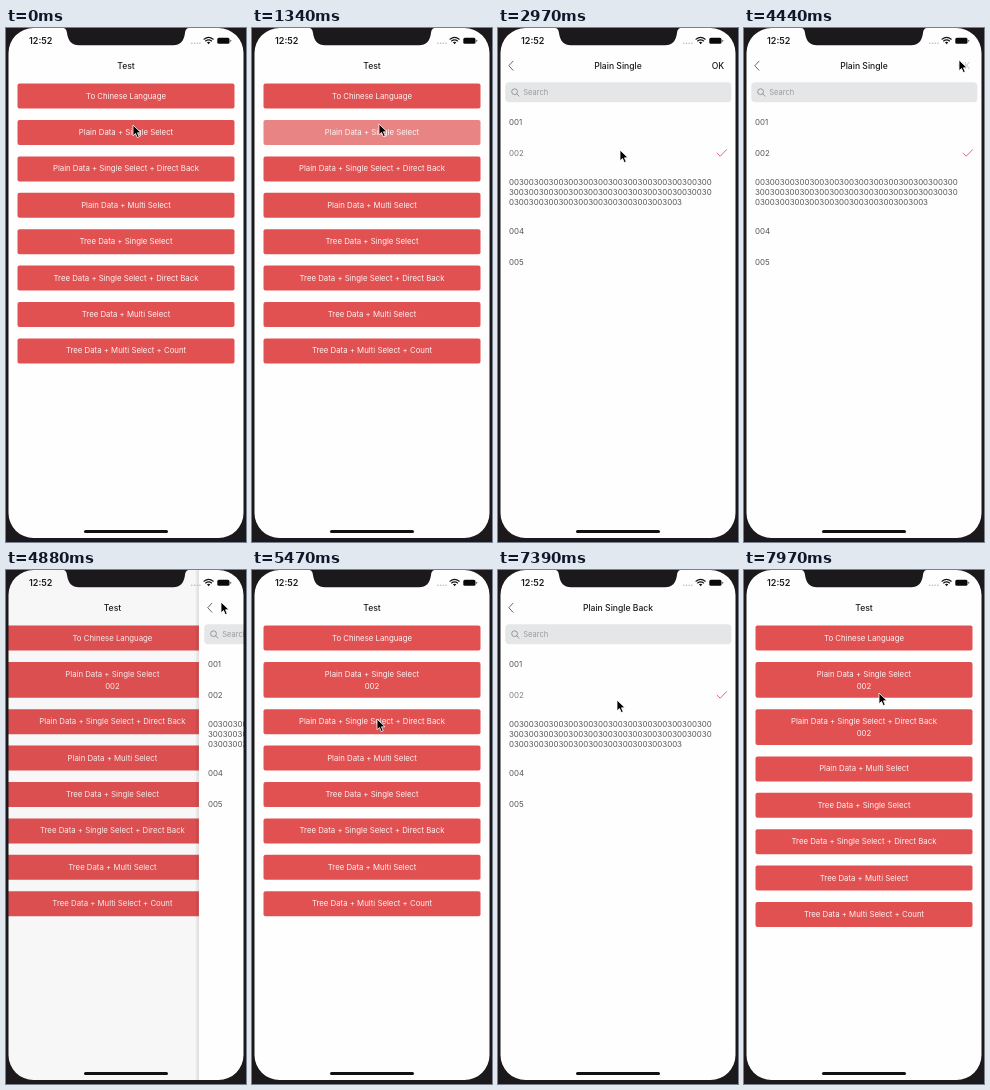
Recreate the animation shown at these times as an HTML page. Size 240 by 514 pixels, loop 8 s.

```html
<!DOCTYPE html>
<html lang="en">
<head>
<meta charset="utf-8">
<title>Picker demo</title>
<style>
  html, body { margin: 0; width: 100%; height: 100%; overflow: hidden; background: #1b191b; }
  svg { display: block; width: 100%; height: 100%; font-family: Inter, "Liberation Sans", sans-serif; }
  .title { font-size: 8.6px; font-weight: 500; fill: #1c1c1e; }
  .mid { text-anchor: middle; }
  .label { font-size: 7.8px; fill: #fff; fill-opacity: .92; text-anchor: middle; }
  .row { font-size: 7.9px; fill: #555; }
  .line { fill: none; stroke-linecap: round; stroke-linejoin: round; }
</style>
</head>
<body>
<svg id="stage" viewBox="0 0 240 514" preserveAspectRatio="none"></svg>
<script>
const LOOP = 8000;
const NS = 'http://www.w3.org/2000/svg';
const stage = document.getElementById('stage');

function add(parent, tag, attrs = {}, text) {
  const el = document.createElementNS(NS, tag);
  for (const key in attrs) el.setAttribute(key, attrs[key]);
  if (text) el.textContent = text;
  parent.appendChild(el);
  return el;
}
const label = (parent, cls, x, y, text) => add(parent, 'text', { class: cls, x, y }, text);
const move = (el, x, y = 0) => el.setAttribute('transform', `translate(${x} ${y})`);
const fade = (el, value) => el.setAttribute('opacity', value);

// Home screen
const home = add(stage, 'g');
add(home, 'rect', { x: 2, width: 236, height: 514, fill: '#fefefe' });
label(home, 'title mid', 120, 40.8, 'Test');
const buttons = [
  'To Chinese Language',
  'Plain Data + Single Select',
  'Plain Data + Single Select + Direct Back',
  'Plain Data + Multi Select',
  'Tree Data + Single Select',
  'Tree Data + Single Select + Direct Back',
  'Tree Data + Multi Select',
  'Tree Data + Multi Select + Count'
].map(text => {
  const g = add(home, 'g');
  const box = add(g, 'rect', { x: 11.5, width: 217, height: 25, rx: 2, fill: '#e15152' });
  label(g, 'label', 120, 15.1, text);
  const value = label(g, 'label', 120, 27, '002');
  return { g, box, value };
});
const dim = add(stage, 'rect', { x: 2, width: 236, height: 514, fill: '#000' });

// Picker screen
const page = add(stage, 'g');
const grad = add(add(stage, 'defs'), 'linearGradient', { id: 'edge' });
add(grad, 'stop', { offset: 0, 'stop-color': '#000', 'stop-opacity': 0 });
add(grad, 'stop', { offset: 1, 'stop-color': '#000', 'stop-opacity': .12 });
add(page, 'rect', { x: -2, width: 4, height: 514, fill: 'url(#edge)' });
add(page, 'rect', { x: 2, width: 236, height: 514, fill: '#fefefe' });
add(page, 'path', { class: 'line', d: 'M15 33.2L10.8 37.7L15 42.2', stroke: '#555', 'stroke-width': .9 });
const title = label(page, 'title mid', 120, 40.8, 'Plain Single');
const ok = label(page, 'title', 213.7, 40.8, 'OK');
add(page, 'rect', { x: 7.3, y: 54.3, width: 226, height: 20, rx: 4, fill: '#e5e6e7' });
add(page, 'circle', { cx: 16.6, cy: 63.7, r: 2.9, fill: 'none', stroke: '#8e8e93', 'stroke-width': .9 });
add(page, 'path', { class: 'line', d: 'M18.8 65.9L21 68.1', stroke: '#8e8e93', 'stroke-width': .9 });
label(page, 'row', 25.3, 67, 'Search').setAttribute('style', 'font-size:7.5px;fill:#9a9a9e');
label(page, 'row', 11, 96.9, '001');
const picked = label(page, 'row', 11, 127.7, '002');
const long = '003'.repeat(39);
for (let i = 0; i < 3; i++) label(page, 'row', 11, 157.3 + i * 9.6, long.substr(i * 41, 41));
label(page, 'row', 11, 205.7, '004');
label(page, 'row', 11, 236.6, '005');
const check = add(page, 'path', { class: 'line', d: 'M219 125.2L222.2 128.2L228.6 121.6', stroke: '#e8546c', 'stroke-width': .9 });

// Status bar and phone body
label(stage, 'title', 23, 16, '12:52').setAttribute('style', 'font-size:9px;font-weight:600');
for (let i = 0; i < 4; i++) add(stage, 'circle', { cx: 185.8 + i * 2.7, cy: 15.3, r: .75, fill: '#b5b5b8' });
add(stage, 'path', { d: 'M202.6 16.2L200.9 14.3Q202.6 13 204.3 14.3Z', fill: '#111' });
for (const [d, y] of [[3, 12.9], [4.6, 11.2]])
  add(stage, 'path', { class: 'line', d: `M${202.6 - d} ${y}Q202.6 ${y - d * .75} ${202.6 + d} ${y}`, stroke: '#111', 'stroke-width': 1.2 });
add(stage, 'rect', { x: 211.3, y: 9.8, width: 12.2, height: 6, rx: 1.6, fill: '#0a0a0a' });
add(stage, 'rect', { x: 224.2, y: 11.8, width: .9, height: 2, rx: .4, fill: '#555' });
add(stage, 'path', {
  d: 'M0 0H240V514H0ZM27.5 0A25 25 0 0 0 2.5 25V485A25 25 0 0 0 27.5 510H212.5A25 25 0 0 0 237.5 485V25A25 25 0 0 0 212.5 0Z',
  fill: '#1b191b', 'fill-rule': 'evenodd'
});
add(stage, 'path', {
  d: 'M56 0C60 0 60.5 2 61 5C62 13 66 17.3 73 17.3H167C174 17.3 178 13 179 5C179.5 2 180 0 184 0Z',
  fill: '#1b191b'
});
add(stage, 'rect', { x: 78, y: 502, width: 84, height: 3, rx: 1.5, fill: '#111' });
const cursor = add(stage, 'path', {
  d: 'M0 0V10.8L2.5 8.5L4.3 12.6L6.2 11.8L4.5 7.8H8Z',
  fill: '#000', stroke: '#fff', 'stroke-width': .8
});

// The picture is refreshed at these times: first, last, count
const ticks = [0, 150, 290, 590, 890, 5910];
for (const [a, b, n] of [[1340, 2380, 8], [2530, 2970, 4], [3410, 4440, 8], [4730, 5770, 8], [6210, 7240, 8], [7390, 7970, 5]])
  for (let i = 0; i < n; i++) ticks.push(Math.round((a + (b - a) * i / (n - 1)) / 10) * 10);
ticks.sort((a, b) => a - b);

const path = [
  [0, 127, 97], [290, 127, 96], [2380, 127, 96], [2820, 122, 122], [3410, 122, 122],
  [4290, 215, 32], [4880, 215, 32], [5470, 125, 149], [5770, 119, 153], [6510, 119, 153],
  [7090, 119, 130], [7530, 119, 130], [7970, 135, 123]
];

const clamp = v => Math.min(1, Math.max(0, v));
const smooth = v => v * v * (3 - 2 * v);

function cursorAt(t) {
  let i = 0;
  while (i < path.length - 2 && path[i + 1][0] <= t) i++;
  const [t0, x0, y0] = path[i], [t1, x1, y1] = path[i + 1];
  const k = smooth(clamp((t - t0) / (t1 - t0)));
  return [x0 + (x1 - x0) * k, y0 + (y1 - y0) * k];
}

// Screen change over 500 ms, cubic-bezier(.2833, .99, .31833, .99)
function slide(t, start) {
  const x = clamp((t - start) / 500);
  const bez = (a, b, s) => 3 * (1 - s) * (1 - s) * s * a + 3 * (1 - s) * s * s * b + s * s * s;
  let lo = 0, hi = 1;
  for (let i = 0; i < 20; i++) {
    const m = (lo + hi) / 2;
    if (bez(.2833, .31833, m) < x) lo = m; else hi = m;
  }
  return x === 0 ? 0 : x === 1 ? 1 : bez(.99, .99, hi);
}

function press(t, down, up, low, back) {
  if (t < down) return 1;
  return low + (1 - low) * clamp((t - up) / back);
}

function draw(t) {
  const second = t >= 5910;
  const p = slide(t, 1340) - slide(t, 4730) + slide(t, 6210) - slide(t, 7390);

  move(home, -71 * p);
  dim.setAttribute('opacity', .15 * p);
  move(page, 236 * (1 - p));
  page.setAttribute('visibility', p > 0 ? 'visible' : 'hidden');

  const filled = [, t >= 4730, t >= 7390];
  const held = [, press(t, 890, 1340, .7, 400), press(t, 5910, 6210, .7, 400)];
  let y = 55.6;
  buttons.forEach(({ g, box, value }, i) => {
    const extra = filled[i] ? 10.8 : 0;
    move(g, 0, y);
    fade(g, held[i] || 1);
    box.setAttribute('height', 25 + extra);
    value.setAttribute('visibility', extra ? 'inherit' : 'hidden');
    y += 36.4 + extra;
  });

  title.textContent = second ? 'Plain Single Back' : 'Plain Single';
  fade(ok, second ? 0 : press(t, 4440, 4730, .2, 300));
  fade(picked, second ? press(t, 7240, 7240, .6, 400) : press(t, 2820, 2820, .6, 300));
  fade(check, (second ? t >= 7390 : t >= 2970) ? 1 : 0);
  move(cursor, ...cursorAt(t));
}

let last = -1;
function frame() {
  const now = performance.now() % LOOP;
  const t = ticks.filter(v => v <= now).pop();
  if (t !== last) draw(last = t);
  requestAnimationFrame(frame);
}
frame();
</script>
</body>
</html>
```
